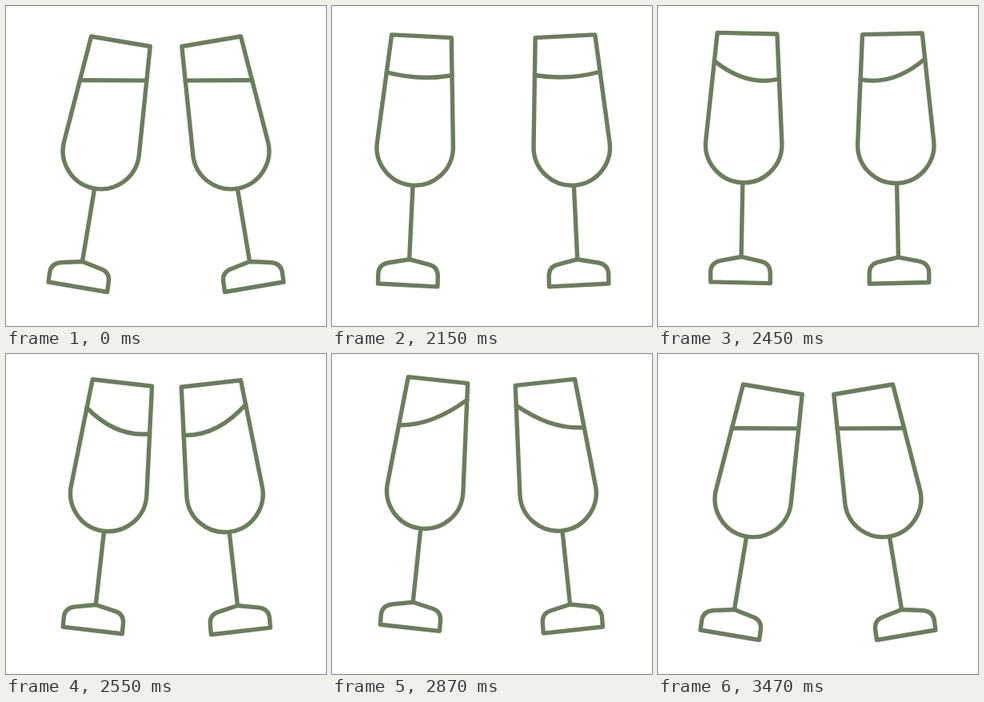
An HTML page that plays this animation: 400x400 px, repeating every 3.52 s.

```html
<!DOCTYPE html>
<html lang="en">
<head>
<meta charset="utf-8">
<title>Cheers</title>
<style>
  html, body { margin: 0; width: 100%; height: 100%; overflow: hidden; background: #fff; }
  svg { display: block; width: 100vw; height: 100vh; }
</style>
</head>
<body>
<svg viewBox="0 0 400 400" fill="none" stroke="#6c7d5e" stroke-width="5.4" stroke-linecap="round" stroke-linejoin="round">
  <defs>
    <g id="glass">
      <path d="M106.5 38L180.2 50.5L166.2 187A47.7 47.7 0 1 1 73 168Z"/>
      <path d="M110.5 229L95.5 319"/>
      <path d="M53 345L126.5 357.5L128.4 344Q129.5 333 119.5 329L95.5 319.5L70 320.5Q56 321 54.5 334Z"/>
    </g>
  </defs>
  <g id="left"><use href="#glass"/><path class="wine"/></g>
  <g transform="matrix(-1 0 0 1 400 0)">
    <g id="right"><use href="#glass"/><path class="wine"/></g>
  </g>
</svg>
<script>
const LOOP = 3520, START = 1992, OUT = 2315, REBOUND = 2870, REST = 3150, CALM = 3470;

// When each part of the motion reaches its stops.
const swingAt = [START, OUT, 2625, REBOUND, REST];
const turnAt = [START, OUT, 2597, REBOUND, REST];
const liftAt = [START, OUT, 2550, 2735, 3090];
const sloshAt = [START, 2350, 2560, REBOUND, REST, CALM];

// Both glasses share the turn and the sag of the wine.
const turn = [0, -13.8, -2.25, -3.45, 0];
const sag = [0, 10.5, 10.5, 8.5, 3, 0];

const glasses = [
  {
    id: 'left',
    swing: [0, -27, 16.5, -1.6, 0],
    lift: [0, 9, 7, 15.3, 0],
    roll: [0, 16, 18.5, -13.5, 3, 0],
    rise: [0, 5.6, 1.8, 8.5, 2, 0]
  },
  {
    id: 'right',
    swing: [0, -34, 15.7, -0.4, 0],
    lift: [0, 9, 6, 11.2, 0],
    roll: [0, 16.5, 21.5, -11.5, 3, 0],
    rise: [0, 6.8, 4, 6.5, 2, 0]
  }
];

// Eases from stop to stop.
function ease(t, times, values) {
  const i = times.findIndex(end => t < end);
  if (i < 1) return 0;
  const u = (t - times[i - 1]) / (times[i] - times[i - 1]);
  return values[i - 1] + (values[i] - values[i - 1]) * u * u * (3 - 2 * u);
}

// The surface ends on the two walls, at the given depths below the rim.
function winePath(outer, inner, sag) {
  const x1 = 106.5 - 0.25 * outer, y1 = 38 + 0.968 * outer;
  const x2 = 180.2 - 0.102 * inner, y2 = 50.5 + 0.995 * inner;
  const cx = (x1 + x2) / 2 - 0.35 * sag, cy = (y1 + y2) / 2 + 1.97 * sag;
  return `M${x1} ${y1}Q${cx} ${cy} ${x2} ${y2}`;
}

function draw(t) {
  for (const g of glasses) {
    const x = ease(t, swingAt, g.swing), y = -ease(t, liftAt, g.lift);
    const roll = ease(t, sloshAt, g.roll), rise = ease(t, sloshAt, g.rise);
    const node = document.getElementById(g.id);
    node.setAttribute('transform',
      `translate(${x} ${y}) rotate(${ease(t, turnAt, turn)} 116.5 197.75)`);
    node.querySelector('.wine').setAttribute('d',
      winePath(56.5 - roll - rise, 42.8 + roll - rise, ease(t, sloshAt, sag)));
  }
}

function tick() {
  draw(performance.now() % LOOP);
  requestAnimationFrame(tick);
}
tick();
</script>
</body>
</html>
```
